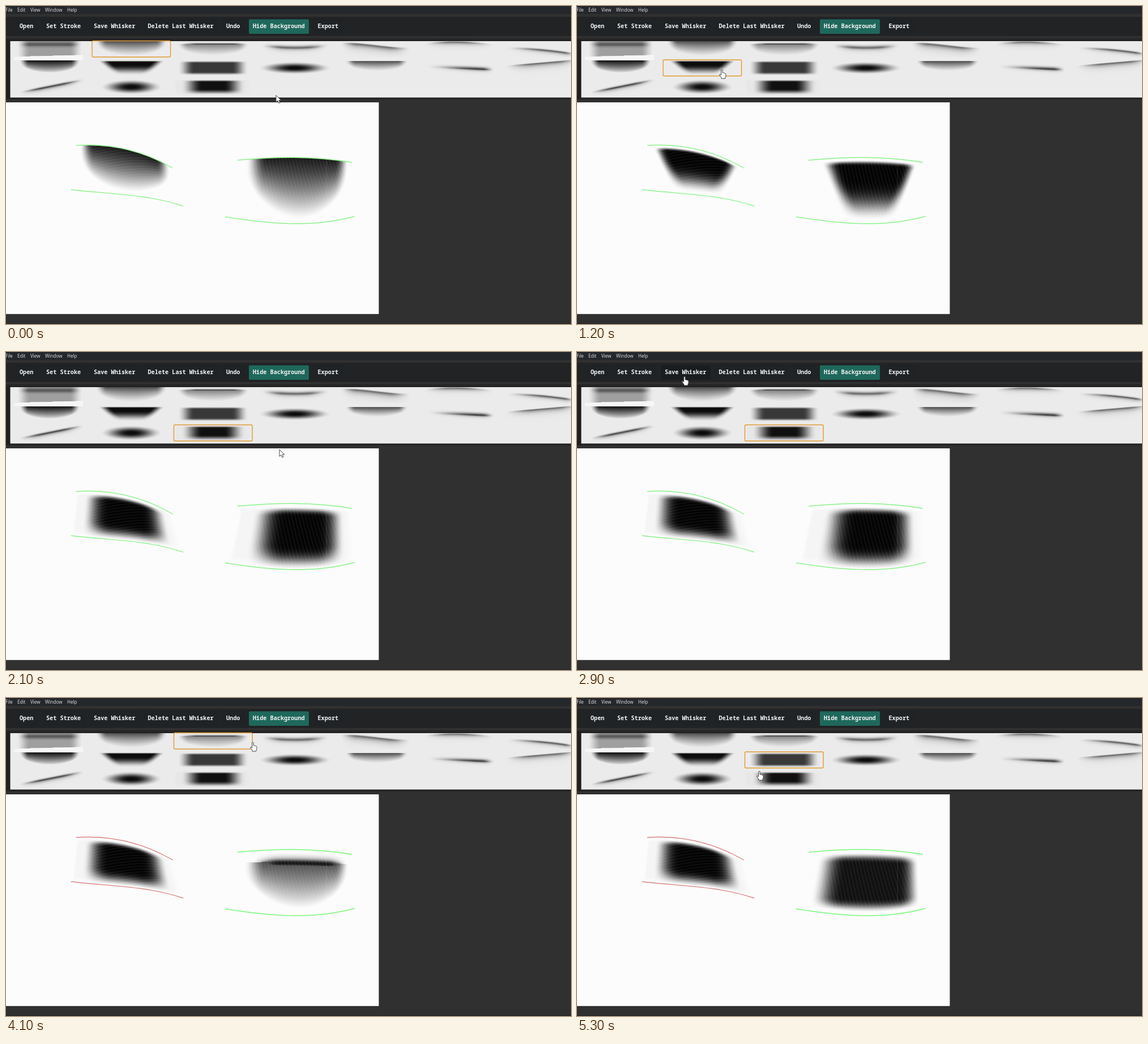
Recreate the animation shown at these times as an HTML page with a canvas. Size 998 by 561 pixels, loop 5400 ms.

```html
<!DOCTYPE html>
<html lang="en">
<head>
<meta charset="utf-8">
<title>Whisker editor</title>
<style>
html, body { margin: 0; width: 100%; height: 100%; overflow: hidden; background: #303030; }
canvas, svg { position: absolute; left: 0; top: 0; width: 998px; height: 561px; display: block; }
.menu { font: 8.1px "Open Sans", "Noto Sans", sans-serif; fill: #e4e4e4; }
.tool { font: 600 10.2px "Noto Sans Mono", "DejaVu Sans Mono", monospace; fill: #f2f2f2; }
</style>
</head>
<body>
<canvas id="paint" width="998" height="561"></canvas>
<svg id="ui" viewBox="0 0 998 561" xmlns="http://www.w3.org/2000/svg">
  <g id="menu" class="menu"></g>
  <g id="tools" class="tool"></g>
  <g id="curves" fill="none" stroke-width="1.4"></g>
  <rect id="pick" width="138.5" height="28.5" rx="2" fill="none" stroke="#e09a33" stroke-width="1.4"/>
  <path id="arrow" d="M0 0V12.2L2.9 9.6L4.9 14L7 13L5.1 8.8H8.8Z" fill="#fff" stroke="#333" stroke-width=".9"/>
  <path id="hand" d="M-1.3 1Q-.1 -.8 1.2 1V6Q2.4 5.2 3.3 6.4Q4.6 5.8 5.3 7Q7 6.7 7 8.6V11.4Q6.8 13.2 5.8 14.2V16H-1V14.3L-4.2 9.9Q-4.6 8.1 -2.8 8.5L-1.3 10Z" fill="#fff" stroke="#333" stroke-width=".9"/>
</svg>
<script>
const $ = id => document.getElementById(id);
const ctx = $("paint").getContext("2d");
const LOOP = 5400, STEP = 100, SAVED = 3200;
const CELL = { x: 7.6, y: 61.3, dx: 144.4, dy: 33.5, w: 139, h: 29 };

// brush shapes: density over u (along) and v (down), both 0..1
const clamp = x => Math.min(1, Math.max(0, x));
const ramp = (a, b, x) => { const t = clamp((x - a) / (b - a)); return t * t * (3 - 2 * t); };
const band = (x, a, b, c, d) => ramp(a, b, x) * (1 - ramp(c, d, x));
const bowl = (top, depth, half, k, pow = 1.2) => (u, v) => {
  const e = (u - .5) / half, reach = depth * Math.sqrt(Math.max(0, 1 - e * e));
  if (v < top || reach < .01) return 0;
  return k * clamp(1 - (v - top) / reach) ** pow * (1 - ramp(.68, 1, Math.abs(e)));
};
const oval = (a, b, k) => (u, v) => k * (1 - ramp(.1, 1, Math.hypot((u - .5) / a, (v - .5) / b)));
const hair = (line, up, down, k, fade) => (u, v) => {
  const t = v - line(u);
  return k * band(u, ...fade) * (t < 0 ? Math.exp(-t * t / up / up) : Math.exp(-t / down));
};
const underLid = bowl(.19, .7, .46, .46, 1.1);

const brushes = [
  (u, v) => band(u, .08, .25, .75, .92) * (v < .97 - .12 * u ? .32 + .3 * Math.exp(-(((v - .22) / .14) ** 2)) : 0),
  bowl(0, .92, .46, .7),
  (u, v) => Math.max(underLid(u, v), band(u, .08, .3, .74, .94) *
    (.1 * band(v, .04, .16, .2, .3) + .62 * Math.exp(-(((v - .21) / .05) ** 2)))),
  hair(u => .28 + .17 * Math.sin(Math.PI * u), .13, .09, .55, [.06, .35, .65, .94]),
  hair(u => .18 + .3 * ramp(.1, .9, u), .06, .16, .55, [.03, .25, .65, .94]),
  hair(u => .1 + .7 * (u - .45) ** 2, .06, .1, .52, [.05, .4, .55, .97]),
  hair(u => .46 + .42 * u * u, .07, .08, .62, [.05, .55, .8, .95]),
  bowl(.03, .75, .39, .95, .8),
  (u, v) => {
    const w = .45 - .24 * v;
    return .95 * ramp(.04, .14, v) * (1 - ramp(w - .15, w, Math.abs(u - .5))) * (1 - ramp(.3, .96, v));
  },
  (u, v) => .76 * band(u, .05, .26, .74, .95) * band(v, .05, .21, .74, .95),
  oval(.47, .39, .95),
  bowl(.08, .6, .4, .7),
  hair(u => .42 + .22 * u, .13, .06, .75, [.08, .75, .8, .96]),
  hair(u => .42 - .41 * u, .04, .13, .58, [.04, .4, .72, 1]),
  hair(u => .97 - .95 * u, .08, .08, .72, [.1, .4, .65, .95]),
  oval(.4, .47, .95),
  (u, v) => .92 * band(u, .09, .36, .64, .91) * band(v, .05, .2, .62, 1) +
    .014 * band(u, .01, .03, .9, 1) * band(v, .05, .1, .85, 1)
];

// lids: evenly spaced control points keep x linear along each curve
const lid = (x0, x1, ...ys) => ({
  x: u => x0 + (x1 - x0) * u, x0, x1,
  y: u => {
    const n = 1 - u;
    return n * n * n * ys[0] + 3 * n * n * u * ys[1] + 3 * n * u * u * ys[2] + u * u * u * ys[3];
  },
  d: `M${x0} ${ys[0]}C${(2 * x0 + x1) / 3} ${ys[1]} ${(x0 + 2 * x1) / 3} ${ys[2]} ${x1} ${ys[3]}`
});
const eyes = [
  { box: [112, 240, 206, 118], lean: 1, top: lid(124, 295, 246, 242, 253, 286), bot: lid(115, 313, 324, 332, 331, 353),
    grain: (u, v) => 16 * v + 10 * u },
  { box: [384, 262, 236, 126], lean: 1.25, seam: 566, top: lid(409, 611, 272, 265.5, 264, 276), bot: lid(387, 616, 372, 384, 392, 371),
    grain: (u, v) => 34 * (u - .17 * v) }
];

function shade(w, h, alphaAt) {
  const c = document.createElement("canvas");
  c.width = w; c.height = h;
  const g = c.getContext("2d"), img = g.createImageData(w, h);
  for (let y = 0; y < h; y++)
    for (let x = 0; x < w; x++)
      img.data[(y * w + x) * 4 + 3] = 255 * alphaAt(x + .5, y + .5);
  g.putImageData(img, 0, 0);
  return c;
}

function renderEye(eye, brush) {
  const [bx, by, w, h] = eye.box, { top, bot } = eye;
  return shade(w, h, (px, py) => {
    const x = px + bx, y = py + by;
    let u = .5, v = .5;
    for (let i = 0; i < 8; i++) {
      const a = top.y(clamp(u));
      v = (y - a) / (bot.y(clamp(u)) - a);
      const l = top.x0 + (bot.x0 - top.x0) * v, r = top.x1 + (bot.x1 - top.x1) * v;
      u = (x - l) / (r - l);
    }
    if (u < 0 || u > 1 || v < 0 || v > 1) return 0;
    const d = brushes[brush](u ** eye.lean, v);
    let a = 1 - (1 - clamp(d)) ** 2;
    a *= 1 - .025 * (1 + Math.sin(2 * Math.PI * eye.grain(u, v)));
    if (eye.seam && Math.abs(x - eye.seam) < .6) a *= .94;
    return a;
  });
}
const cache = {};
const eyeImage = (i, b) => cache[i + ":" + b] ||= renderEye(eyes[i], b);

const cellAt = i => [CELL.x + CELL.dx * (i % 7), CELL.y + CELL.dy * Math.floor(i / 7)];

// fixed backdrop
const back = document.createElement("canvas");
back.width = 998; back.height = 561;
{
  const g = back.getContext("2d");
  const fill = (c, x, y, w, h) => { g.fillStyle = c; g.fillRect(x, y, w, h); };
  fill("#303030", 0, 0, 998, 561);
  fill("#24272b", 0, 0, 998, 14);
  fill("#212325", 0, 19, 998, 34);
  fill("#252525", 0, 57, 998, 5);
  fill("#202020", 0, 59, 7.5, 104);
  fill("#1d1d1d", 6, 61, 992, 102);
  fill("#252525", 0, 163, 998, 2);
  fill("#ebebeb", 7.5, 62, 991, 99.5);
  fill("#1f1f1f", 0, 543, 659, 1.5);
  fill("#fcfcfc", 0, 170, 658.5, 373.5);
  fill("#262626", 0, 559.5, 998, 1.5);
  g.save();
  g.beginPath(); g.rect(7.5, 62, 991, 99.5); g.clip();
  g.fillStyle = "#f6f6f6";
  g.beginPath(); g.moveTo(14, 90); g.lineTo(136, 86.5); g.lineTo(136, 95.5); g.lineTo(14, 95.5); g.fill();
  brushes.forEach((f, i) => {
    const thumb = shade(CELL.w * 2, CELL.h * 2, (x, y) => clamp(f(x / CELL.w / 2, y / CELL.h / 2)));
    g.drawImage(thumb, ...cellAt(i), CELL.w, CELL.h);
  });
  g.restore();
}

// menu, buttons and lid curves
const add = (parent, tag, attrs, text) => {
  const el = document.createElementNS("http://www.w3.org/2000/svg", tag);
  for (const k in attrs) el.setAttribute(k, attrs[k]);
  if (text) el.textContent = text;
  return parent.appendChild(el);
};
[["File", -1], ["Edit", 20], ["View", 43], ["Window", 69], ["Help", 108]]
  .forEach(([s, x]) => add($("menu"), "text", { x, y: 9.8 }, s));
const buttons = {};
[["Open", 24], ["Set Stroke", 71], ["Save Whisker", 155], ["Delete Last Whisker", 250.5],
 ["Undo", 389], ["Hide Background", 436], ["Export", 550.5]].forEach(([s, x]) => {
  const on = s === "Hide Background";
  buttons[s] = add($("tools"), "rect", { x: x - 7, y: 23.5, width: s.length * 6.12 + 14.2, height: 25.5, rx: 2, fill: on ? "#1f685c" : "#1f2326" });
  add($("tools"), "text", { x, y: 39.4 }, s);
});
const save = buttons["Save Whisker"];
const lids = eyes.map(e => [e.top, e.bot].map(l => add($("curves"), "path", { d: l.d })));

// time, hotspot x, y
const track = [
  [0, 477, 157.5], [300, 500, 78], [500, 490, 80], [700, 445, 105], [800, 375, 109], [1000, 305, 109],
  [1100, 272, 111], [1200, 256, 112], [1400, 235, 75], [1700, 235, 138], [1900, 345, 140], [2100, 483, 172],
  [2400, 541, 166], [2900, 190, 43], [3600, 197, 42], [3900, 400, 85], [4100, 436, 78], [4400, 480, 105],
  [4700, 480, 74], [5000, 400, 106], [5300, 322, 129]
];
// time, chosen brush
const picks = [
  [0, 1], [300, 3], [700, 10], [800, 9], [1100, 8], [1400, 1], [1700, 15], [2000, 16],
  [SAVED, -1], [4000, 2], [4400, 10], [4700, 3], [5000, 9]
];

const pickAt = t => picks.filter(p => p[0] <= Math.max(0, t)).pop()[1];
function pointer(t) {
  const i = Math.max(1, track.findIndex(k => k[0] >= t));
  const [a, b] = [track[i - 1], track[i]];
  const s = ramp(a[0], b[0], t);
  return [a[1] + (b[1] - a[1]) * s, a[2] + (b[2] - a[2]) * s];
}
function overBrush(x, y) {
  const col = Math.floor((x - CELL.x) / CELL.dx), row = Math.floor((y - CELL.y) / CELL.dy);
  return row >= 0 && row < 3 && col >= 0 && col < 7 && row * 7 + col < brushes.length;
}

function draw(t) {
  const chosen = pickAt(t), shown = pickAt(t - STEP);
  const right = shown < 0 ? 16 : shown, left = t >= SAVED ? 16 : right;
  ctx.drawImage(back, 0, 0);
  [left, right].forEach((b, i) => ctx.drawImage(eyeImage(i, b), eyes[i].box[0], eyes[i].box[1]));

  const saved = t >= SAVED, green = saved ? "#78f878" : "#8cf28c";
  lids[0].forEach(p => p.setAttribute("stroke", saved ? "#d98484" : green));
  lids[1].forEach(p => p.setAttribute("stroke", green));

  const pick = $("pick");
  pick.style.display = chosen < 0 ? "none" : "";
  if (chosen >= 0) {
    const [x, y] = cellAt(chosen);
    pick.setAttribute("x", x + .1);
    pick.setAttribute("y", y + .2);
  }

  const [x, y] = pointer(t);
  const onSave = x > 147 && x < 236 && y > 23 && y < 50;
  const hot = onSave || overBrush(x, y);
  save.setAttribute("fill", onSave ? "#1a1d20" : "#1f2326");
  save.setAttribute("stroke", saved && t < 4000 ? "#393c3f" : "none");
  save.setAttribute("stroke-width", 2.4);
  $("hand").style.display = hot ? "" : "none";
  $("arrow").style.display = hot ? "none" : "";
  $(hot ? "hand" : "arrow").setAttribute("transform", `translate(${x.toFixed(1)} ${y.toFixed(1)})`);
}

let last = -1;
const start = performance.now();
function tick(now) {
  const t = Math.floor(Math.max(0, now - start) % LOOP / STEP) * STEP;
  if (t !== last) draw(last = t);
  requestAnimationFrame(tick);
}
draw(0);
requestAnimationFrame(tick);
</script>
</body>
</html>
```
